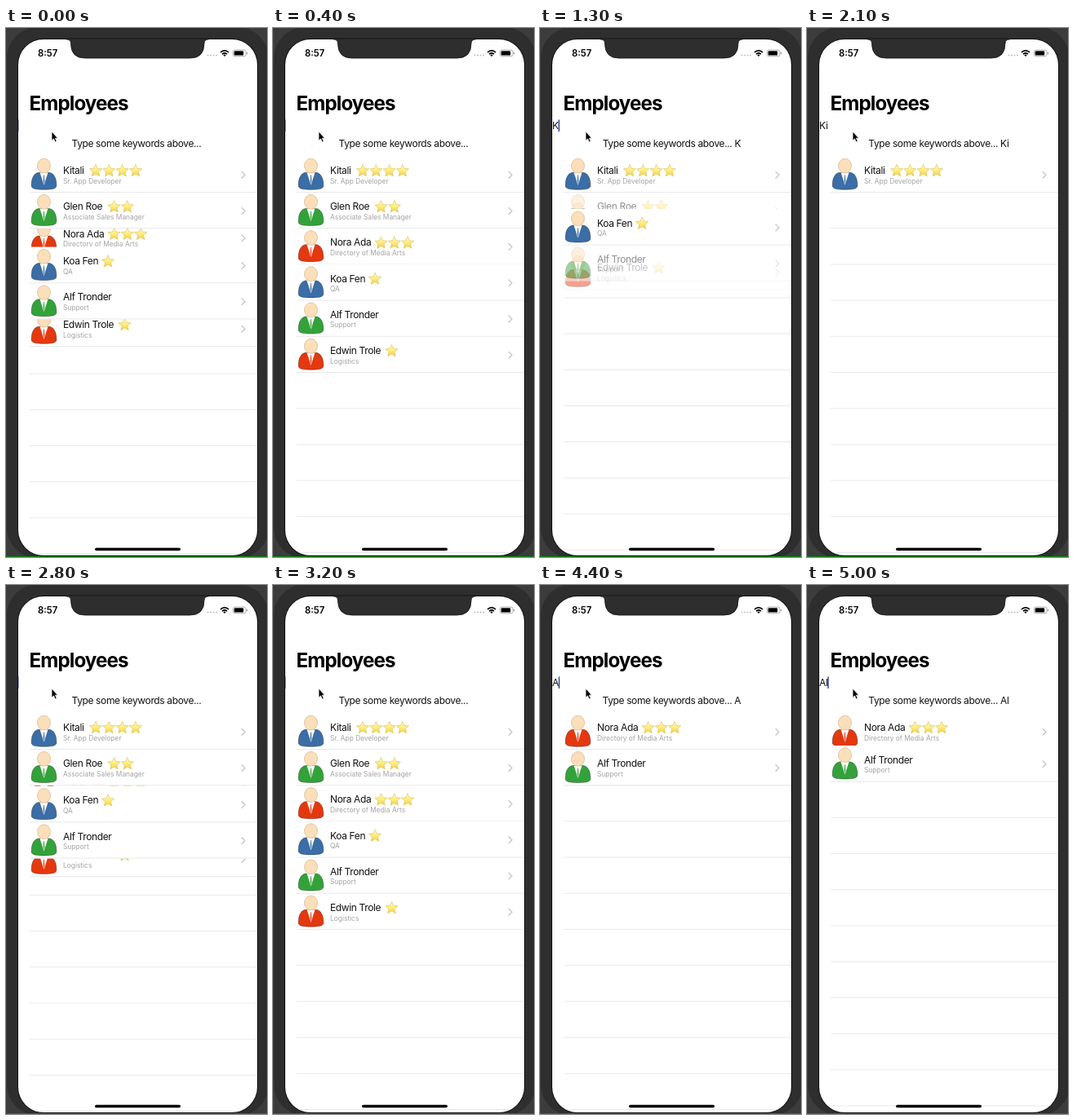
Recreate the animation shown at these times as an HTML page. Size 320 px wide and 649 px high, loop 5100 ms.

```html
<!DOCTYPE html>
<html lang="en">
<head>
<meta charset="utf-8">
<title>Employees</title>
<style>
  html, body { margin: 0; width: 100%; height: 100%; overflow: hidden; background: #3c3c3c; }
  svg { display: block; width: 320px; height: 649px; font-family: Inter, Roboto, sans-serif; }
  text { white-space: pre; }
  .body { font-size: 12px; letter-spacing: -.031em; fill: #111; }
  .sub { font-size: 8.4px; fill: #a3a3a6; }
  .title { font-size: 24.2px; font-weight: 700; letter-spacing: -.038em; }
  .clock { font-size: 11.3px; font-weight: 600; }
  .rule { stroke: #e9e9eb; stroke-width: 1; }
</style>
</head>
<body>
<svg viewBox="0 0 320 649">
  <defs>
    <clipPath id="screen"><rect x="15" y="14" width="293" height="633" rx="31"/></clipPath>
    <linearGradient id="gold" x1="0" y1="0" x2="0" y2="1">
      <stop offset="0" stop-color="#fffbd0"/>
      <stop offset=".5" stop-color="#fdee80"/>
      <stop offset="1" stop-color="#f3cf45"/>
    </linearGradient>
    <path id="star" fill="url(#gold)" stroke="#d9bd55" stroke-width=".6" stroke-linejoin="round"/>
    <g id="person">
      <path d="M39.500 20C33.500 21.500 30.800 28 31.200 37C32 40.300 38 41 46.500 41S61 40.300 61.800 37C62.200 28 59.500 21.500 53.500 20Z"
            stroke="#0006" stroke-width=".8"/>
      <path d="M41.500 20H51.500L46.500 35.500Z" fill="#fff"/>
      <path d="M46.200 23H46.900L47.300 30L46.500 34.500L45.700 30Z"/>
      <ellipse cx="46.500" cy="11.800" rx="8" ry="8.900" fill="#fbdfba" stroke="#dcbb90" stroke-width=".8"/>
    </g>
  </defs>

  <rect width="320" height="649" fill="#3c3c3c"/>
  <rect x="1" y="-1" width="321" height="652" rx="38" fill="#2e2e2e"/>
  <rect x="14" y="13" width="295" height="635" rx="32" fill="#111"/>
  <rect y="648" width="320" height="1" fill="#0a7d10"/>

  <g clip-path="url(#screen)">
    <rect x="15" y="14" width="293" height="633" fill="#fff"/>
    <g id="grid"></g>
    <g id="list"></g>
    <text class="title" x="28.500" y="101">Employees</text>
    <text class="body" id="field" x="15" y="123.700"></text>
    <rect id="caret" y="112.500" width="1.500" height="14.500" fill="#3a4a9c"/>
    <text class="body" id="label" x="161.400" y="145.800" text-anchor="middle"></text>
    <rect x="109" y="637.700" width="105" height="3.600" rx="1.800" fill="#000"/>

    <text class="clock" x="39" y="35">8:57</text>
    <g fill="#c4c4c4">
      <circle cx="247.500" cy="33.500" r="1.100"/><circle cx="251" cy="33.500" r="1.100"/>
      <circle cx="254.500" cy="33.500" r="1.100"/><circle cx="258" cy="33.500" r="1.100"/>
    </g>
    <g fill="none" stroke="#000" stroke-width="1.700">
      <path d="M263 29.800Q268 25.300 273 29.800M265 32.100Q268 29.400 271 32.100"/>
    </g>
    <path d="M266.300 33.200Q268 31.900 269.700 33.200L268 35Z"/>
    <rect x="278.500" y="27" width="15.500" height="7.800" rx="2.200" fill="none" stroke="#999" stroke-width=".8"/>
    <rect x="279.700" y="28.200" width="11.500" height="5.400" rx="1.200"/>
    <rect x="294.900" y="29.500" width="1.200" height="2.800" rx=".6" fill="#999"/>
  </g>

  <path d="M74 13V14Q79.500 14 79.500 19Q79.500 37 97 37H225.500Q243 37 243 19Q243 14 248.500 14V13Z" fill="#2e2e2e" stroke="#111" stroke-width=".8"/>
  <path d="M56 127V138.200L58.500 135.900L60.300 140L62.200 139.100L60.400 135.200H63.500Z"
        fill="#000" stroke="#fff" stroke-width=".8"/>
</svg>
<script>
const LOOP = 5100, STEP = 100, MOVE = 300;
const TOP = 157.3, PITCH = 44.2;
const BLUE = '#3b6da6', GREEN = '#33a23a', RED = '#e4380f';

// name, role, shirt, star count, x of first star
const people = [
  ['Kitali', 'Sr. App Developer', BLUE, 4, 110],
  ['Glen Roe', 'Associate Sales Manager', GREEN, 2, 132.5],
  ['Nora Ada', 'Directory of Media Arts', RED, 3, 132.5],
  ['Koa Fen', 'QA', BLUE, 1, 125],
  ['Alf Tronder', 'Support', GREEN, 0, 0],
  ['Edwin Trole', 'Logistics', RED, 1, 145.5],
];

// key time, field text before, field text after, delay of the list
const keys = [
  [-198, 'K', '', 0],
  [1100, '', 'K', 0],
  [1400, 'K', 'Ki', 0],
  [2300, 'Ki', 'K', 0],
  [2648, 'K', '', 0],
  [3300, '', 'A', 0],
  [4900, 'A', 'Al', 33],
];

const $ = id => document.getElementById(id);

function add(parent, tag, attrs, text) {
  const el = document.createElementNS('http://www.w3.org/2000/svg', tag);
  for (const k in attrs) el.setAttribute(k, attrs[k]);
  if (text) el.textContent = text;
  return parent.appendChild(el);
}

function starPath(r) {
  let d = '';
  for (let i = 0; i < 10; i++) {
    const a = i * Math.PI / 5, q = i % 2 ? r * .46 : r;
    d += `${i ? 'L' : 'M'}${q * Math.sin(a)} ${-q * Math.cos(a)}`;
  }
  return d + 'Z';
}
$('star').setAttribute('d', starPath(8));

const rows = people.map(([name, role, shirt, stars, x]) => {
  const g = add($('list'), 'g');
  add(g, 'rect', { x: 15, width: 293, height: PITCH, fill: '#fff' });
  add(g, 'use', { href: '#person', fill: shirt });
  add(g, 'text', { class: 'body', x: 70, y: 21.7 }, name);
  add(g, 'text', { class: 'sub', x: 70, y: 33.3 }, role);
  for (let i = 0; i < stars; i++) add(g, 'use', { href: '#star', x: x + i * 16.3, y: 18 });
  add(g, 'path', { d: 'M288.700 18.600L293 22.900L288.700 27.200', fill: 'none', stroke: '#c5c5c9', 'stroke-width': 1.3 });
  add(g, 'path', { class: 'rule', d: `M29 ${PITCH}H308` });
  return g;
});

const rules = Array.from({ length: 11 }, () => add($('grid'), 'path', { class: 'rule', d: 'M29 0H308' }));

// cubic-bezier(.42, 0, .58, 1)
function ease(x) {
  if (x <= 0) return 0;
  if (x >= 1) return 1;
  let lo = 0, hi = 1;
  for (let i = 0; i < 20; i++) {
    const s = (lo + hi) / 2, r = 1 - s;
    if (1.26 * r * r * s + 1.74 * r * s * s + s ** 3 < x) lo = s; else hi = s;
  }
  return lo * lo * (3 - 2 * lo);
}

const lerp = (a, b, p) => a + (b - a) * p;
const place = (el, y) => el.setAttribute('transform', `translate(0 ${y})`);

function caretAlpha(idle) {
  if (idle < 600) return 1;
  const ph = (idle - 600) % 700;
  return ph < 100 || (ph >= 400 && ph < 500) ? .5 : ph < 400 ? 0 : 1;
}

function layoutList(before, after, p) {
  const was = people.map(([n]) => n.includes(before));
  const now = people.map(([n]) => n.includes(after));
  const rank = (set, i) => set.slice(0, i).filter(Boolean).length;
  const kept = i => was[i] && now[i];

  rows.forEach((g, i) => {
    const shown = now[i] || (was[i] && p < 1);
    g.style.display = shown ? '' : 'none';
    g.style.opacity = kept(i) ? 1 : now[i] ? Math.min(1, p * 2.5) : Math.min(1, 2 * (1 - p));
    place(g, TOP + PITCH * lerp(rank(was, i), rank(now, i), p));
  });

  const count = lerp(rank(was, 6), rank(now, 6), p);
  rules.forEach((r, i) => {
    r.style.display = i + 1 < count ? 'none' : '';
    place(r, TOP + PITCH * (i + 1 + count % 1));
  });
}

// Staying rows lie on top; among the others the upper ones cover the lower.
function stack(before, after) {
  const stays = i => people[i][0].includes(before) && people[i][0].includes(after);
  rows.map((g, i) => [g, i])
    .sort(([, a], [, b]) => stays(a) - stays(b) || b - a)
    .forEach(([g]) => $('list').appendChild(g));
}

let current;
function draw(t) {
  const key = keys.findLast(k => k[0] <= t);
  const [at, before, after, delay] = key;
  if (key !== current) {
    current = key;
    stack(before, after);
    $('field').textContent = after;
    $('label').textContent = 'Type some keywords above...\u00a0' + after;
  }
  $('caret').setAttribute('x', after ? 14.8 + $('field').getComputedTextLength() : 14);
  $('caret').style.opacity = caretAlpha(t - at);
  layoutList(before, after, ease((t - at - delay) / MOVE));
}

const start = performance.now();
function tick() {
  const t = (performance.now() - start) % LOOP;
  draw(Math.floor(t / STEP) * STEP);
  requestAnimationFrame(tick);
}
tick();
</script>
</body>
</html>
```
